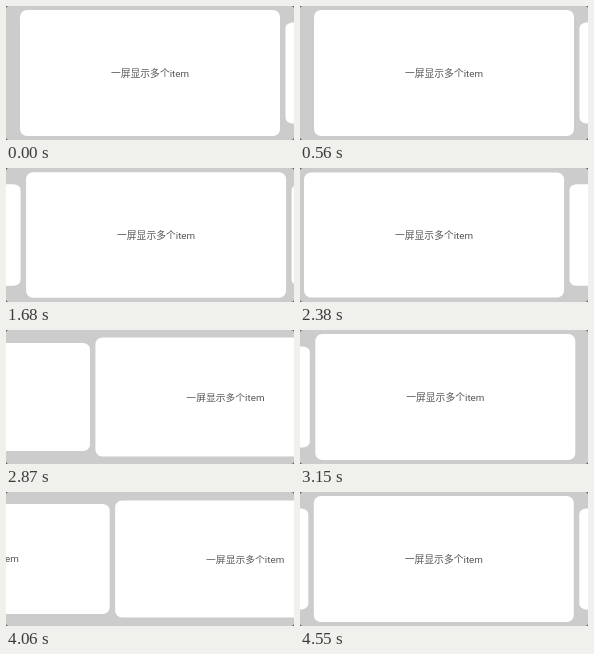
An HTML page that plays this animation: 288 px wide and 134 px high, repeating every 4760 ms.

```html
<!DOCTYPE html>
<html lang="zh">
<head>
<meta charset="utf-8">
<style>
html, body { margin: 0; width: 100%; height: 100%; overflow: hidden; background: #555; }
#stage { position: relative; width: 288px; height: 134px; overflow: hidden; background: #ccc; border-radius: 3px; }
.card {
  position: absolute; left: 14px; top: 4px; width: 260px; height: 126px;
  border-radius: 7px; background: #fff; color: #555;
  font: 9.8px/128px Roboto, "Noto Sans CJK SC", "Noto Sans CJK", sans-serif;
  text-align: center; white-space: nowrap;
}
</style>
</head>
<body>
<div id="stage">
  <div class="card">一屏显示多个item</div>
  <div class="card">一屏显示多个item</div>
  <div class="card">一屏显示多个item</div>
</div>
<script>
const LOOP = 4760, STEP = 70, PITCH = 265.5;
const cards = document.querySelectorAll('.card');

// Each swipe: finger drag with growing speed, then a quintic settle.
const swipes = [
  { start: 910, drag: 420, reach: 78, power: 1.7, settle: 705, dir: 1 },
  { start: 2240, drag: 560, reach: 121, power: 1.8, settle: 574, dir: 1 },
  { start: 3570, drag: 560, reach: 121, power: 1.8, settle: 574, dir: -1 }
];

function travel(s, t) {
  const d = t - s.start;
  if (d <= 0) return 0;
  if (d < s.drag) return s.reach * (d / s.drag) ** s.power;
  const left = Math.max(0, 1 - (d - s.drag) / s.settle);
  return PITCH - (PITCH - s.reach) * left ** 5;
}

function draw(now) {
  const t = Math.floor((now % LOOP) / STEP) * STEP;
  const scroll = swipes.reduce((sum, s) => sum + s.dir * travel(s, t), 0);
  cards.forEach((card, i) => {
    const x = i * PITCH - scroll;
    const scale = 1 - 0.2 * Math.min(1, Math.abs(x) / PITCH);
    card.style.transform = `translateX(${x}px) scaleY(${scale})`;
  });
}

const begin = performance.now();
function tick() {
  draw(performance.now() - begin);
  requestAnimationFrame(tick);
}
tick();
</script>
</body>
</html>
```
